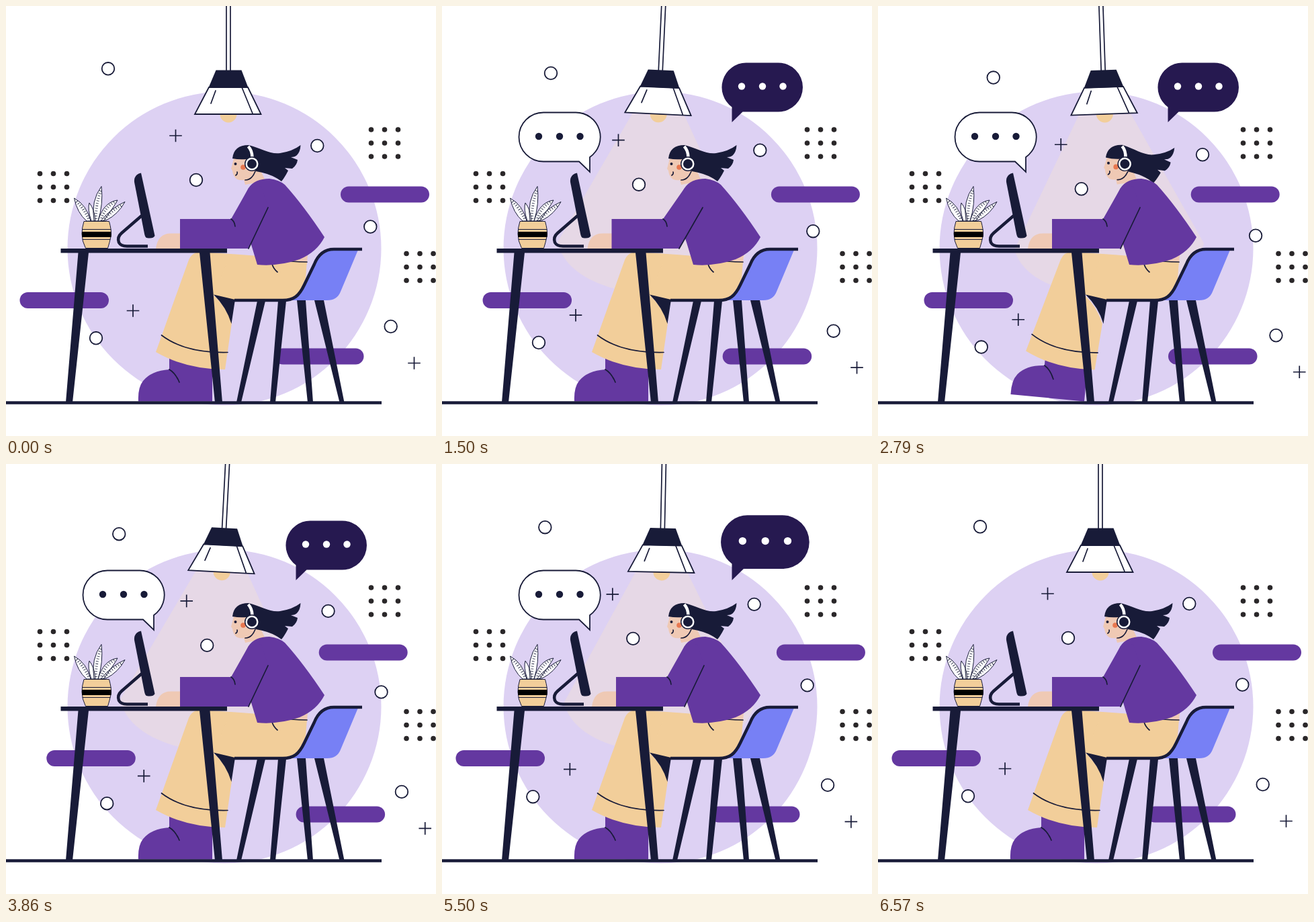
An HTML page that plays this animation: 640 px wide and 640 px high, repeating every 7.21 s.

```html
<!DOCTYPE html>
<html lang="en">
<head>
<meta charset="utf-8">
<title>Working at a desk</title>
<style>
html, body { margin: 0; width: 100%; height: 100%; overflow: hidden; background: #fff; }
svg { display: block; width: 100vw; height: 100vh; }
.ink { fill: #181b38; }
.purple { fill: #6438a0; }
.beige { fill: #f2ce9a; }
.skin { fill: #efc9b4; }
.line { fill: none; stroke: #181b38; stroke-width: 1.7; stroke-linecap: round; }
.thick { fill: none; stroke: #181b38; stroke-width: 4.5; }
.paper { fill: #fff; stroke: #181b38; stroke-width: 1.8; }
.leaf { fill: #fff; stroke: #181b38; stroke-width: 1; }
.vein { fill: none; stroke: #181b38; stroke-width: 4; stroke-dasharray: .8 3; }
</style>
</head>
<body>
<svg viewBox="0 0 640 640">
  <circle cx="325" cy="361" r="233.5" fill="#ddd1f3"/>
  <g class="purple">
    <rect id="barLeft" x="20.5" y="426" width="132.5" height="24" rx="12"/>
    <rect id="barLow" x="400" y="509.5" width="132.5" height="24" rx="12"/>
    <rect id="barRight" x="498" y="268.5" width="132" height="24" rx="12"/>
  </g>
  <g id="dots" fill="#2a2729"></g>
  <path id="light" d="M292 162 H370 L472 358 C450 453 212 453 190 358Z" fill="#ffeabf"/>
  <g id="drift"></g>

  <g id="lamp">
    <path class="line" d="M328 -40V97M334 -40V97"/>
    <path class="beige" d="M318.500 161a12.500 12.500 0 0 0 25 0Z"/>
    <path class="paper" d="M302 121H360L379.500 161H281Z"/>
    <path class="ink" d="M312.500 95.500H350.500L360.500 121.500H301.500Z"/>
    <path class="line" d="M312 126L305 145M351 121L367 160"/>
  </g>

  <g id="foot">
    <path class="purple" d="M243 522H307V588.500H197Q196 568 204 558Q216 543 243 541Z"/>
    <path class="line" d="M243 541Q252 546 258 560"/>
  </g>
  <path class="skin" d="M420 370H449L448 384H420Z"/>
  <path class="beige" d="M283 366Q340 369 374 372L400 378Q425 381 448 380L446 405L436 428Q427 438 412 438H341L309 430L272 400Z"/>
  <g id="shin">
    <path class="beige" d="M290 366Q277 366 272 378Q254 428 232 490L223 515Q268 541 326 541L336 472Q328 448 309 430L330 380Z"/>
    <path class="line" d="M231.500 490Q267 517 330 515.500"/>
  </g>
  <path class="ink" d="M309 429.500L341 437L335.500 473Q328 448 309 429.500Z"/>
  <path class="line" d="M396 384Q398 391 404 396M400 377Q425 381 448 381"/>

  <g id="head">
    <path class="skin" d="M340 222Q337 236 335 242L337 245Q338 254 344 258Q349 260 354 259L356 266L386 260L375 236L355 222Z"/>
    <circle cx="353" cy="240" r="3.800" fill="#e87850"/>
    <circle class="ink" cx="341.500" cy="235" r="2"/>
    <path class="line" d="M344 247Q345 250 342 252M371 246Q366 259 356 259"/>
    <path class="ink" d="M337 227Q339 207 361 207C380 212 393 221 408 219Q427 216 438.500 207Q438 217 433 222Q430 225 424 225L434 229Q433 237 426 242L415 241L420 245Q415 255 410 261Q396 250 372 246L358 228Q347 229 337 227Z"/>
    <path d="M360.500 209Q366.500 215 366.500 226" fill="none" stroke="#fff" stroke-width="4.500"/>
    <circle class="ink" cx="366" cy="235" r="11"/>
    <circle class="ink" cx="366" cy="235" r="8.300" stroke="#fff" stroke-width="2.500"/>
  </g>
  <path class="purple" d="M361 271Q370 257 392 257Q407 259 415 266Q443 297 474 344Q463 366 437 377Q405 388 374 385L364 352L346 300Z"/>
  <path class="skin" id="hand" d="M260 361H223Q226 338.500 245 338.500H260Z"/>
  <path class="purple" id="sleeve"/>
  <path class="line" id="folds"/>

  <path fill="#7780f5" d="M478 363H524L498 425Q493 438 478 438H420Q434 436 441 424L462 378Q467 366 478 363Z"/>
  <path class="ink" d="M374 439H386L350 590H343ZM405 439H417L401 590H393ZM433 438H446L457 590H449ZM459 438H473L503.500 590H496.500Z"/>
  <path class="thick" d="M340 438H412C428 438 436 432 444 415L459 384Q468 362 488 362H530"/>

  <path class="ink" d="M81.500 361H329V367.500H81.500ZM107.500 367H123L99 590H89ZM288 367H303.500L322 590H311Z"/>
  <path class="ink" d="M191 262Q190 251 201 248.500L221.500 342Q219 347 209 345Q207 344 206 339Z"/>
  <path class="thick" d="M202 312L172 338Q165 344 168 352Q171 357.500 180 357.500H211"/>
  <g id="plant">
    <path class="leaf" d="M126 320Q120 296 101.500 286Q106 308 120 320ZM131 320Q126 290 142 268.500Q145 295 137 320ZM137 320Q145 292 166 289Q160 300 145 320ZM141 320Q157 300 177 291.500Q167 310 149 319ZM127 320Q121 302 124 293Q132 303 133 320Z"/>
    <path class="vein" d="M105 291Q117 303 124 319M141 275Q133 297 134 319M161 292Q147 300 141 319M171 297Q156 306 146 318"/>
    <path class="beige" stroke="#181b38" d="M116 320.500H153.500Q157 333 156.500 341Q154 353 151.500 360.500H118.500Q113 350 113 339Q113 330 116 320.500Z"/>
    <path d="M113 336H156.500V344H113Z"/>
    <path class="line" style="stroke-width:1" d="M114 332.500H156M114 347.500H155"/>
  </g>
  <path class="thick" d="M0 590.500H559"/>

  <g id="bubbleWhite">
    <path class="paper" d="M151 158.500H199a36.500 36.500 0 0 1 21 66.500V247L204 231.500H151a36.500 36.500 0 0 1 0 -73Z"/>
    <g class="ink"><circle cx="144" cy="194" r="5.200"/><circle cx="175" cy="194" r="5.200"/><circle cx="205.500" cy="194" r="5.200"/></g>
  </g>
  <g id="bubbleDark">
    <path fill="#261950" d="M452.500 84.500H500.500a36.500 36.500 0 0 1 0 73H447.500L431.500 173V150.500A36.500 36.500 0 0 1 452.500 84.500Z"/>
    <g fill="#fff"><circle cx="446" cy="119.500" r="5.200"/><circle cx="477" cy="119.500" r="5.200"/><circle cx="507.500" cy="119.500" r="5.200"/></g>
  </g>
</svg>
<script>
const LOOP = 7210, FPS = 14, LAST = 92;
const $ = id => document.getElementById(id);
const set = (id, name, value) => $(id).setAttribute(name, value);
const move = (id, value) => set(id, 'transform', value);
const clamp = v => Math.max(0, Math.min(1, v));
const ramp = (t, start, length) => clamp((t - start) / length);
const sine = p => (1 - Math.cos(Math.PI * p)) / 2;
const backIn = p => p * p * (3.3 * p - 2.3);

for (const [x, y] of [[50.5, 249.5], [543.5, 184], [596, 368.5]])
  for (let i = 0; i < 9; i++)
    $('dots').innerHTML += `<circle cx="${x + i % 3 * 20}" cy="${y + Math.floor(i / 3) * 20}" r="3.8"/>`;

const rings = [[152, 93.3], [463.3, 208], [283, 259], [542.3, 328.5], [134, 494.3], [572.7, 477]];
const pluses = [[252.5, 193], [189, 453.5], [607.5, 531.5]];
$('drift').innerHTML =
  rings.map(([x, y]) => `<circle class="paper" cx="${x}" cy="${y}" r="9.3"/>`).join('') +
  pluses.map(([x, y]) => `<path class="line" style="stroke-linecap:butt" d="M${x - 9.3} ${y}h18.6M${x} ${y - 9.3}v18.6"/>`).join('');

// Short bump of the given width in the middle of each beat
function pulse(t, period, center, width) {
  const d = (t % period - center) / width;
  return Math.abs(d) < .5 ? Math.cos(Math.PI * d) ** 2 : 0;
}

function slide(id, t, start, distance) {
  const p = sine(ramp(t, start, 1500)) - sine(ramp(t, start + 3050, 1500));
  move(id, `translate(${distance * p})`);
}

function pop(id, t, start, end, x, y) {
  const scale = t < 3000 ? 1 - backIn(1 - ramp(t, start, 600)) : 1 - backIn(ramp(t, end, 600));
  move(id, `translate(${x} ${y}) scale(${Math.max(0, scale)}) translate(${-x} ${-y})`);
}

function reach(a) {
  const cuff = 259 - 6.5 * a, elbow = 335 - 6 * a, low = 361 - 8 * a, high = 390 - 2 * a;
  move('hand', `translate(${-6.5 * a})`);
  set('sleeve', 'd', `M${cuff} 317H${elbow}L361 271L380 268L${high} 300L${low} 361H${cuff}Z`);
  set('folds', 'd', `M${high} 300L${low} 361M${elbow} 317Q${elbow + 5} 320 ${elbow + 6} 328`);
}

function draw(now) {
  const step = Math.min(LAST, Math.floor((now % LOOP + 5) * FPS / 1000));
  const t = step * 1000 / FPS;

  const d = t < 6000 ? sine(t / 3000) : 0;
  move('drift', `translate(${20 * d} ${13.4 * d})`);
  slide('barLeft', t, 400, 48);
  slide('barLow', t, 700, 32);
  slide('barRight', t, 1000, -32.3);

  const swing = t > 580 && step < LAST ? 4 * Math.sin((t - 580) / 1200 * Math.PI) : 0;
  move('lamp', `rotate(${swing} 331 -27)`);
  move('light', `rotate(${swing} 331 -27)`);
  set('light', 'opacity', .25 * (ramp(t, 300, 400) - ramp(t, 5600, 400)));

  const beat = t < 6000 ? pulse(t, 750, 500, 500) : 0;
  move('foot', `rotate(${5.8 * beat} 307 588)`);
  move('shin', `rotate(${1.2 * beat} 300 370)`);
  move('head', `rotate(${3.2 * beat} 365 262)`);
  reach(pulse(t, 900, 600, 450));

  pop('bubbleDark', t, 200, 5350, 431.5, 173);
  pop('bubbleWhite', t, 500, 5500, 220, 247);
}

const begin = performance.now();
function tick() {
  draw(performance.now() - begin);
  requestAnimationFrame(tick);
}
tick();
</script>
</body>
</html>
```
